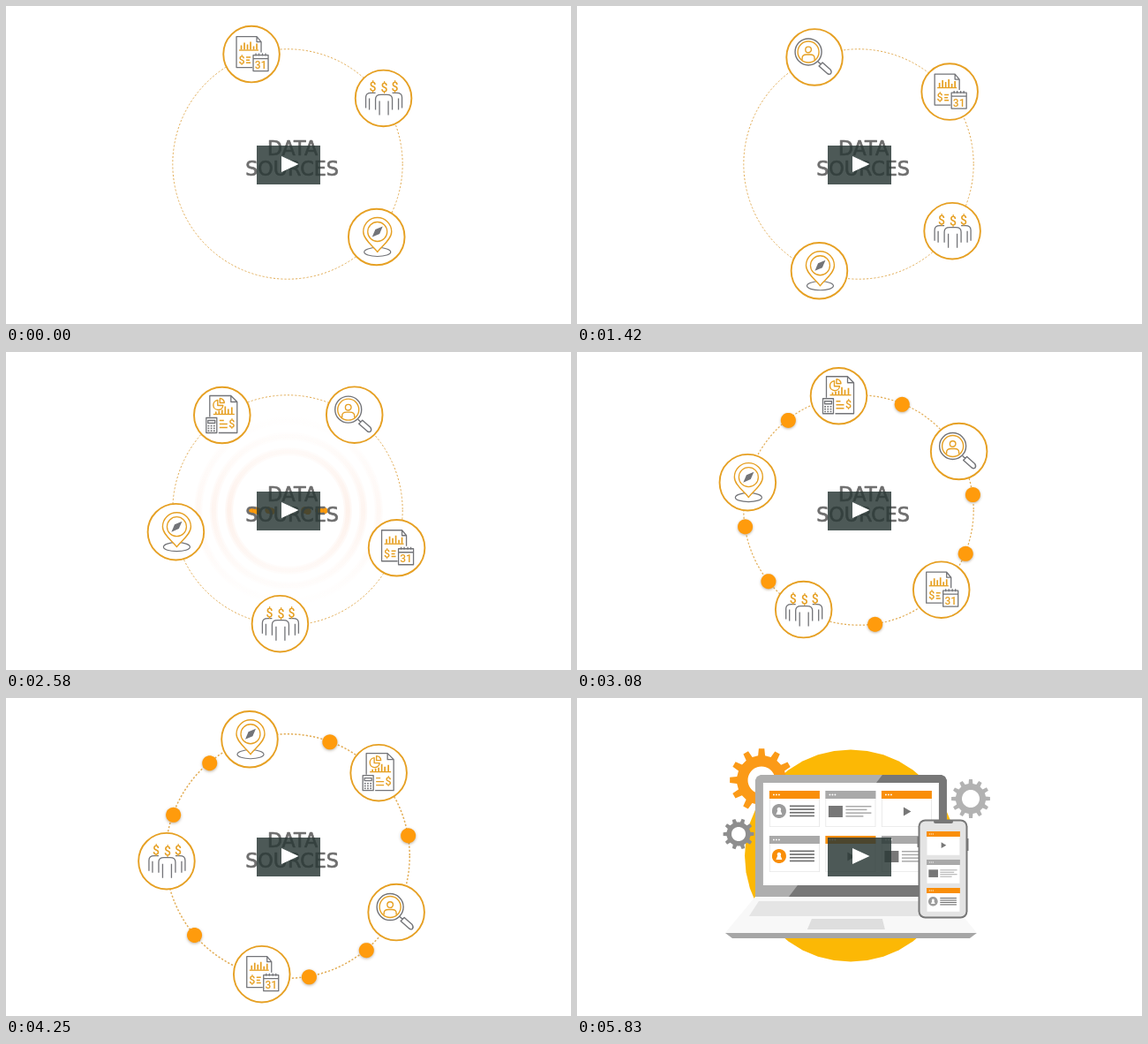
An HTML page with a canvas for the animation above (5910 ms loop, 640 by 360 pixels).

```html
<!DOCTYPE html>
<html lang="en">
<head>
<meta charset="utf-8">
<title>Data sources</title>
<style>
html, body { margin: 0; width: 100%; height: 100%; overflow: hidden; background: #fff; }
canvas { display: block; }
</style>
</head>
<body>
<canvas id="stage" width="640" height="360"></canvas>
<script>
const ctx = document.getElementById('stage').getContext('2d');
const LOOP = 5910, FPS = 12, TAU = Math.PI * 2;
const ORANGE = '#e6a023', HOT = '#f98e09', DOT = '#ff9b0c', GRAY = '#737478', SILVER = '#a9a9a9';
const flat = (x, y) => [x, y];
let project = flat;

// Smooth value through pairs of time and value.
function tween(t, ...k) {
  if (t <= k[0]) return k[1];
  for (let i = 2; i < k.length; i += 2) {
    if (t < k[i]) {
      const u = (t - k[i - 2]) / (k[i] - k[i - 2]);
      return k[i - 1] + (k[i + 1] - k[i - 1]) * u * u * (3 - 2 * u);
    }
  }
  return k[k.length - 1];
}

function placed(x, y, scale, draw) {
  if (scale <= 0) return;
  ctx.save();
  ctx.translate(x, y);
  ctx.scale(scale, scale);
  draw();
  ctx.restore();
}

function poly(color, points) {
  ctx.beginPath();
  for (const [x, y] of points) ctx.lineTo(...project(x, y));
  ctx.fillStyle = color;
  ctx.fill();
}

const box = (color, x, y, w, h) => poly(color, [[x, y], [x + w, y], [x + w, y + h], [x, y + h]]);

const disc = (color, x, y, r) => poly(color, Array.from({ length: 40 }, (_, i) =>
  [x + r * Math.cos(i / 40 * TAU), y + r * Math.sin(i / 40 * TAU)]));

function hoop(color, width, x, y, r) {
  ctx.beginPath();
  ctx.arc(x, y, Math.max(r, 0), 0, TAU);
  ctx.strokeStyle = color;
  ctx.lineWidth = width;
  ctx.stroke();
}

function line(color, width, path) {
  ctx.strokeStyle = color;
  ctx.lineWidth = width;
  ctx.stroke(new Path2D(path));
}

function label(text, x, y, font, color) {
  ctx.font = font;
  ctx.fillStyle = color;
  ctx.textAlign = 'center';
  ctx.fillText(text, x, y);
}

const symbol = (text, x, y, size) => label(text, x, y, `500 ${size}px Roboto, sans-serif`, ORANGE);

function heading(text, x, y) {
  label(text, x, y, '22.2px "DejaVu Sans", sans-serif', '#6e6e6e');
  ctx.strokeStyle = '#6e6e6e';
  ctx.lineWidth = 0.7;
  ctx.strokeText(text, x, y);
}

// Icons, drawn around their own centre.
function report() {
  line(GRAY, 1.3, 'M1 15H-17V-20H6L11-14V-2M6-20V-14H11');
  line(ORANGE, 1.3, 'M-14-4.5H8');
  line(ORANGE, 1.7, 'M-11.5-5v-5M-8-5v-8M-4.5-5v-6M-1-5v-9M2.5-5v-4M6-5v-7');
  line(ORANGE, 1.5, 'M-6 3.5h5M-6 6.7h4M-6 9.8h5');
  symbol('$', -11, 11, 12.5);
  ctx.fillStyle = '#fff';
  ctx.fillRect(2, 0, 17, 19);
  line(GRAY, 1.3, 'M2 1H19V19H2ZM2 5H19M5-1v3M8.5-1v3M12.5-1v3M16-1v3');
  symbol('31', 10.5, 16.5, 12);
}

function people() {
  line(GRAY, 1.3, 'M-20 11V-1Q-20-6-14-6H-9M-16 0V13M21 11V-1Q21-6 15-6H10M17 0V13');
  line(GRAY, 1.3, 'M-9 13V1Q-9-4-3-4H4Q10-4 10 1V13M-4.5 3V19M5.5 3V19');
  symbol('$', -12, -8, 14);
  symbol('$', 1, -7, 14);
  symbol('$', 13, -8, 14);
}

function pin() {
  ctx.beginPath();
  ctx.ellipse(1, 17, 15, 5, 0, 0, TAU);
  ctx.strokeStyle = GRAY;
  ctx.lineWidth = 1.2;
  ctx.stroke();
  const drop = 'M1 17C-3 11-15 3-15-6A16 16 0 1 1 17-6C17 3 5 11 1 17Z';
  ctx.fillStyle = '#fff';
  ctx.fill(new Path2D(drop));
  line(ORANGE, 1.4, drop);
  hoop(ORANGE, 1.3, 1, -6, 11);
  poly(GRAY, [[7, -12], [3.4, -3.6], [-5, 0], [-1.4, -8.4]]);
}

function search() {
  hoop(GRAY, 1.4, -7, -6, 15);
  hoop(ORANGE, 1.4, -7, -6, 12);
  hoop(ORANGE, 1.4, -7, -8.5, 3.3);
  line(ORANGE, 1.4, 'M-14 3V1Q-14-3-9-3H-5Q0-3 0 1V3');
  line(GRAY, 1.4, 'M4 5L7 8M5 10L9 6L18 14Q20 17 18 19Q16 20 14 18Z');
}

function budget() {
  line(GRAY, 1.3, 'M-14 2V-22H10L17-15V20H-4M10-22V-15H17');
  line(ORANGE, 1.4, 'M-5-17A5.5 5.5 0 1 0 1-11H-5ZM-2.5-14V-19A5 5 0 0 1 2.5-14Z');
  line(ORANGE, 1.3, 'M-10-1H14');
  line(ORANGE, 1.7, 'M-7-1v-3M-3.5-1v-4M0-1v-5M3.5-1v-9M7-1v-6M11-1v-8');
  line(ORANGE, 1.4, 'M-3 6h5M-3 10h9M-3 14h9');
  symbol('$', 11, 14.5, 12.5);
  line(GRAY, 1.3, 'M-18 3H-6V20H-18ZM-16 6H-8V9H-16Z');
  for (let i = 0; i < 9; i++) box(GRAY, -16.3 + i % 3 * 3.2, 11.3 + (i / 3 | 0) * 2.8, 1.8, 1.6);
}

const popIn = (t, delay) =>
  tween(t - delay, 0.22, 0, 0.75, 1.02, 0.92, 0.92, 1.1, 1);

const ICONS = [
  { draw: pin, offset: 148.8 },
  { draw: people, offset: 74.5 },
  { draw: report, offset: 0 },
  { draw: search, offset: -74.7, delay: 0 },
  { draw: budget, offset: -145, delay: 1.4 },
];

function drawRipples(t) {
  const glow = tween(t, 2.4, 0, 2.58, 1, 2.95, 0);
  if (!glow) return;
  const fade = ctx.createLinearGradient(0, 80, 0, 280);
  fade.addColorStop(0, 'rgba(250,210,190,.02)');
  fade.addColorStop(0.5, 'rgba(250,210,190,.16)');
  fade.addColorStop(1, 'rgba(250,210,190,.02)');
  for (let i = 0; i < 3; i++) {
    const r = 67 + i * 17.5 + (t - 2.58) * 90;
    ctx.globalAlpha = glow * (1 - i * 0.25);
    hoop(fade, 9, 320, 180, r);
    hoop(fade, 5, 320, 180, r);
  }
  ctx.globalAlpha = 1;
}

function drawOrbit(t) {
  const cx = 319, cy = 179, spin = 49.75 * t;
  const R = 130.2 * tween(t, 4.05, 1, 4.33, 1.077, 4.72, 0);
  const shrink = tween(t, 4.4, 1, 4.72, 0);
  const rad = deg => deg * Math.PI / 180;

  drawRipples(t);
  ctx.setLineDash([2.2, 2]);
  hoop('#e3ae58', tween(t, 2.8, 1, 3.4, 1.5), cx, cy, R);
  ctx.setLineDash([]);

  if (t > 2.48) {
    const rx = tween(t, 2.48, 0, 2.58, 0.315, 3.05, 1) * R;
    const ry = tween(t, 2.56, 0, 3.1, 1) * R;
    const size = tween(t, 2.48, 2, 2.58, 3.8, 3.05, 8.5) * shrink;
    ctx.save();
    ctx.shadowColor = 'rgba(90,60,20,.4)';
    ctx.shadowBlur = 3 * ry / 130;
    ctx.shadowOffsetY = ry / 130;
    for (let i = 0; i < 12; i++) {
      const a = rad(spin - 161.4 + i * 30);
      disc(DOT, cx + 0.5 + rx * Math.sin(a), cy + 0.7 - ry * Math.cos(a), size);
    }
    ctx.restore();
  }

  ctx.globalAlpha = tween(t, 4.4, 1, 4.7, 0);
  heading('DATA', 324.5, 168.6);
  heading('SOURCES', 324, 191.6);
  ctx.globalAlpha = 1;

  for (const { draw, offset, delay } of ICONS) {
    const a = rad(spin - 18.8 + offset);
    const scale = shrink * (delay === undefined ? 1 : popIn(t, delay));
    placed(320 + R * Math.sin(a), 177.8 - R * Math.cos(a), scale, () => {
      disc('#fff', 0, 0, 32);
      hoop(ORANGE, 1.9, 0, 0, 31.8);
      draw();
    });
  }
}

function card(x, y, s, kind, head, accent = '#9c9c9c') {
  const bar = (color, bx, by, w, h) => box(color, x + bx * s, y + by * s, w * s, h * s);
  const dot = (color, dx, dy, r) => disc(color, x + dx * s, y + dy * s, r * s);
  bar('#e6e6e6', 0, 0, 57, 41);
  bar('#fff', 0.8, 0.8, 55.4, 39.4);
  bar(head, 0, 0, 57, 9);
  for (let i = 0; i < 3; i++) dot('#fff', 5 + i * 3, 4.5, 0.9);
  if (kind === 'user') {
    dot(accent, 11, 23, 8);
    dot('#fff', 11, 21, 2.2);
    poly('#fff', [[9.5, 22], [12.5, 22], [14.5, 27], [7.5, 27]].map(p => [x + p[0] * s, y + p[1] * s]));
    for (let i = 0; i < 4; i++) bar('#707070', 23, 16.5 + i * 3.7, 28, 1.7);
  } else if (kind === 'image') {
    bar('#777', 3.5, 17, 16, 13);
    for (let i = 0; i < 4; i++) bar('#aaa', 23, 17 + i * 3.7, [29, 24, 29, 20][i], 1.5);
  } else {
    poly('#777', [[25, 18.5], [33.5, 23.5], [25, 28.5]].map(p => [x + p[0] * s, y + p[1] * s]));
  }
}

function drawLaptop(t) {
  const tilt = tween(t, 4.92, 0.137, 5.3, 0);
  const open = tween(t, 4.7, 0.1, 4.91, 0.98, 5.3, 1);
  project = (x, y) => [310.5 + (x - 310.5) * (1 + tilt * (225 - y) / 138), 225 - (225 - y) * open];
  const corner = [[413, 87], [417, 89], [419, 93], [419, 225]];
  poly('#aeaeae', [[202, 225], [202, 93], [204, 89], [208, 87], ...corner]);
  poly('#777', [[346, 87], ...corner, [240, 225]]);
  box('#fff', 211, 96, 199, 116);
  const kinds = ['user', 'image', 'play', 'user', 'play', 'image'];
  kinds.forEach((kind, i) =>
    card(218 + i % 3 * 63.5, i < 3 ? 105 : 156, 1, kind, i % 2 ? SILVER : HOT, i === 3 ? HOT : undefined));
  project = flat;
  poly('#f8f8f8', [[202, 225], [419, 225], [453, 266], [168, 266]]);
  poly('#e5e5e5', [[206, 230], [415, 230], [427, 247], [195, 247]]);
  poly('#dedede', [[266, 250], [346, 250], [349, 262], [261, 262]]);
  poly('#a6a6a6', [[168, 266], [453, 266], [445, 272], [176, 272]]);
}

function drawPhone() {
  const pill = (color, x, y, w, h, r) => {
    ctx.beginPath();
    ctx.roundRect(x, y, w, h, r);
    ctx.fillStyle = color;
    ctx.fill();
  };
  box('#777', 385.5, 157, 3, 12);
  box('#777', 440.5, 159, 3, 14);
  pill('#777', 386.5, 137.5, 56, 112, 8);
  pill('#e4e4e4', 388.5, 139.5, 52, 108, 6);
  pill('#777', 404, 138, 22, 4, 2);
  card(396, 151, 0.665, 'play', HOT);
  card(396, 183, 0.665, 'image', SILVER);
  card(396, 215, 0.665, 'user', HOT);
}

function gear(color, x, y, r, hole, teeth, turn, scale) {
  placed(x, y, scale, () => {
    const points = [];
    for (let i = 0; i < teeth; i++)
      [[-0.17, 1], [0.17, 1], [0.27, 0.78], [0.73, 0.78]].forEach(([shift, k]) => {
        const a = (i + shift) / teeth * TAU + turn;
        points.push([r * k * Math.cos(a), r * k * Math.sin(a)]);
      });
    poly(color, points);
    disc('#fff', 0, 0, hole);
  });
}

function drawDevices(t) {
  if (t < 4.66) return;
  const cx = tween(t, 5.1, 320, 5.6, 310);
  const halo = tween(t, 4.66, 0, 4.92, 121, 5.4, 150);
  const turn = (t - 5.83) * 0.8;
  hoop(`rgba(253,243,239,${tween(t, 4.92, 1, 5.6, 0)})`, 8, 320, 180, halo);
  disc('#fcb805', cx, 178.5, tween(t, 4.66, 0, 4.92, 117, 5.2, 122, 5.5, 120));

  gear('#fb9a17', 209, 93, 36, 15.5, 12, turn, tween(t, 5.15, 0, 5.45, 1.08, 5.65, 1));
  gear('#8e8e8e', 183, 154, 17.5, 8, 10, -turn, tween(t, 5.25, 0, 5.5, 1.1, 5.7, 1));
  gear('#b2b2b2', 446, 114, 22, 10, 12, -turn, tween(t, 5.25, 0, 5.55, 1.25, 5.75, 1));

  placed(cx + 0.4, 178, tween(t, 4.68, 0, 4.92, 0.772, 5.25, 1.05, 5.5, 1), () => {
    ctx.translate(-310.5, -178);
    drawLaptop(t);
  });
  placed(414.5, 194, tween(t, 5.25, 0, 5.55, 1.06, 5.75, 1), () => {
    ctx.translate(-414.5, -194);
    drawPhone();
  });

  placed(320, 180, tween(t, 4.66, 0, 4.75, 4, 4.92, 1, 5.05, 0), () => {
    ctx.fillStyle = HOT;
    ctx.fill(new Path2D('M-40-5Q5 2 54-5L50 1Q5 6-40-5Z'));
    ctx.fill(new Path2D('M-15-27Q8 0 20 26Q-5 6-15-27Z'));
  });
}

function drawButton() {
  box('rgba(41,56,53,.83)', 284, 158, 72, 44);
  poly('#fff', [[312, 170], [331.5, 179], [312, 188]]);
}

function render(now) {
  const t = Math.floor((now % LOOP + 4) / 1000 * FPS) / FPS;
  ctx.fillStyle = '#fff';
  ctx.fillRect(0, 0, 640, 360);
  ctx.lineJoin = 'round';
  if (t < 4.72) drawOrbit(t);
  drawDevices(t);
  drawButton();
}

const start = performance.now();
(function tick() {
  render(performance.now() - start);
  requestAnimationFrame(tick);
})();
</script>
</body>
</html>
```
